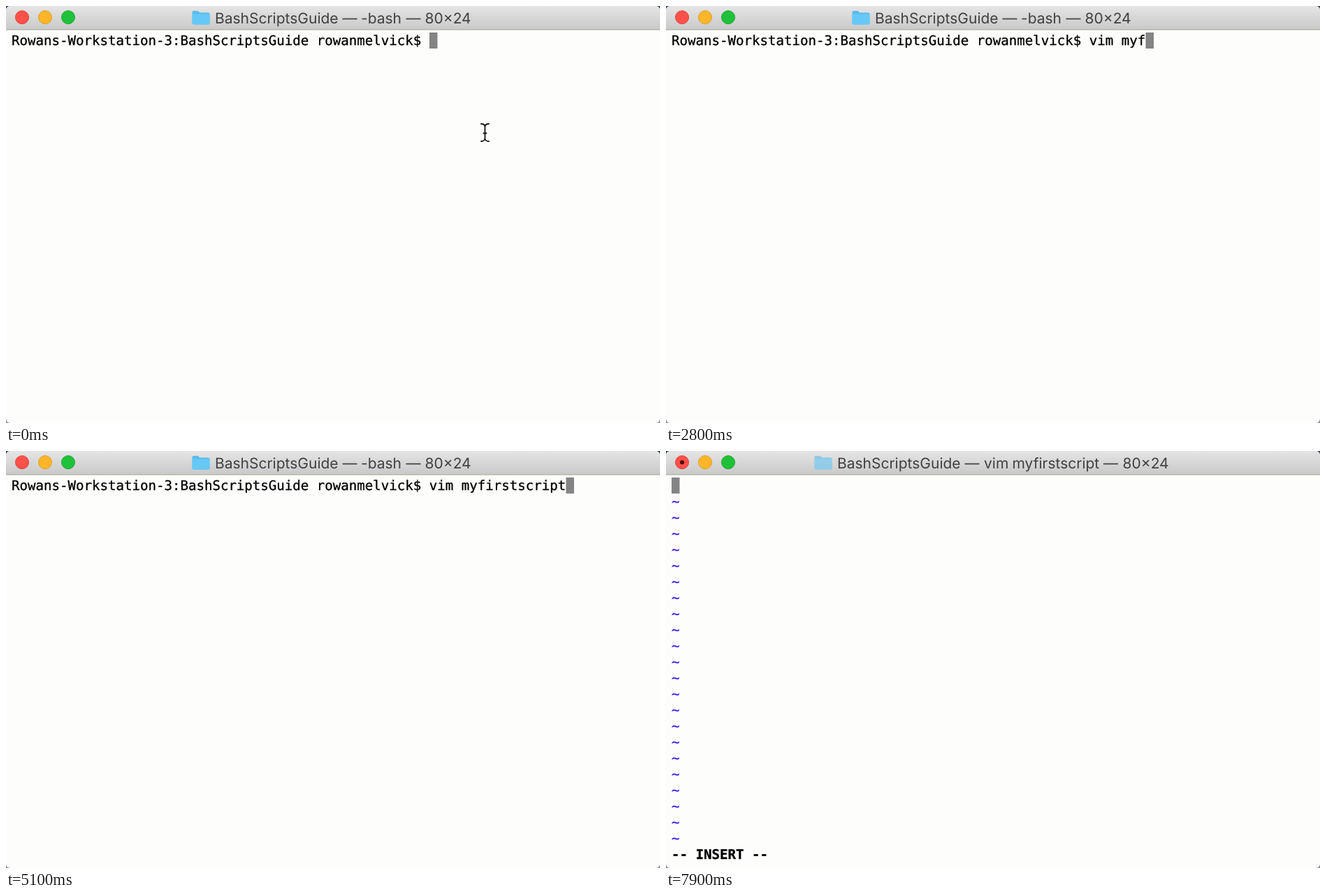
An HTML page for the animation above (8000 ms loop, 936x598 px).

```html
<!DOCTYPE html>
<html lang="en">
<head>
<meta charset="utf-8">
<title>Terminal</title>
<style>
  html, body { margin: 0; width: 100%; height: 100%; overflow: hidden; background: #8b8d90; }
  svg { display: block; width: 936px; height: 598px; }
  text { white-space: pre; text-rendering: geometricPrecision; }
  .mono { font: 19.1px "DejaVu Sans Mono", monospace; stroke-width: 0.3; }
  .bold { font-weight: bold; }
  .title { font: 21px Inter, sans-serif; fill: #404040; }
</style>
</head>
<body>
<svg viewBox="0 0 936 598">
  <defs>
    <linearGradient id="bar" x2="0" y2="1">
      <stop stop-color="#e5e5e5"/>
      <stop offset="1" stop-color="#c9c9c9"/>
    </linearGradient>
    <clipPath id="frame"><rect width="936" height="598" rx="6"/></clipPath>
  </defs>
  <rect width="936" height="20" fill="#34435c"/>
  <g clip-path="url(#frame)">
    <rect width="936" height="598" fill="#fdfdfc"/>
    <rect width="936" height="34" fill="url(#bar)"/>
    <rect y="33.5" width="936" height="1" fill="#a6a694"/>
  </g>
  <g>
    <circle cx="23" cy="16.2" r="9.5" fill="#fe5149" stroke="#e2443d"/>
    <circle cx="56" cy="16.2" r="9.5" fill="#fdb62a" stroke="#dd9f27"/>
    <circle cx="89" cy="16.2" r="9.5" fill="#20c13a" stroke="#1ba830"/>
  </g>
  <circle id="dot" cx="23" cy="16.2" r="3" fill="#4c0605"/>
  <g id="folder">
    <path d="M.5 9q0-2 2-2h6l3 2.500h12q2 0 2 2V24.500q0 2-2 2H2.500q-2 0-2-2z" fill="#58bcec"/>
    <path d="M.5 11.500h25V24.500q0 2-2 2H2.500q-2 0-2-2z" fill="#66c8f6"/>
  </g>
  <g id="title" class="title"></g>
  <rect id="cursor" y="38" width="11.5" height="23" fill="#848484"/>
  <text id="line" class="mono" x="8" y="56" stroke="#000"></text>
  <g id="tildes" class="mono" fill="#3a14f5" stroke="#3a14f5"></g>
  <text id="status" class="mono" x="8" y="585" stroke="#000"></text>
  <g id="pointer" fill="none" stroke-linecap="round">
    <path id="beam" stroke="#fff" stroke-width="4"
      d="M680 169q5 0 5.5 4q.5-4 5.5-4M685.5 173V190M680 194q5 0 5.5-4q.5 4 5.5 4M683.5 182.5h4"/>
  </g>
</svg>
<script>
const $ = id => document.getElementById(id);
const LOOP = 8000, CELL = 11.5, ROW = 23;
const PROMPT = 'Rowans-Workstation-3:BashScriptsGuide rowanmelvick$ ';
const COMMAND = 'vim myfirstscript';
// One keystroke time per character of the command
const KEYS = [1000, 1200, 1400, 1600, 2100, 2400, 2700, 3000, 3200,
              3400, 3600, 3900, 4100, 4300, 4500, 4700, 5000];
const OPEN = 5600, INSERT = 7000;

const SHELL_TITLE = [['BashScriptsGuide', 299], ['—', 481.5], ['-bash', 508],
                     ['—', 572.5], ['80×24', 599.5]];
const VIM_TITLE = [['BashScriptsGuide', 245], ['—', 427.5], ['vim', 455],
                   ['myfirstscript', 495.5], ['—', 626], ['80×24', 653.5]];

const label = (text, x, y) => `<text x="${x}" y="${y}">${text}</text>`;
const show = (id, on) => $(id).style.display = on ? '' : 'none';

$('tildes').innerHTML =
  Array.from({ length: 22 }, (_, i) => label('~', 8, 56 + ROW * (i + 1))).join('');

// Dark beam over its white outline
const front = $('beam').cloneNode();
front.removeAttribute('id');
front.setAttribute('stroke', '#111');
front.setAttribute('stroke-width', 1.8);
$('pointer').append(front);

let titleMode;
function setTitle(vim) {
  if (titleMode === vim) return;
  titleMode = vim;
  const words = vim ? VIM_TITLE : SHELL_TITLE;
  $('title').innerHTML = words.map(([word, x]) => label(word, x, 24.5)).join('');
  $('folder').setAttribute('transform', `translate(${words[0][1] - 33} 0)`);
  $('folder').setAttribute('opacity', vim ? 0.6 : 1);
}

function draw(t) {
  const vim = t >= OPEN, insert = t >= INSERT;
  const typed = KEYS.filter(k => k <= t).length;
  const line = vim ? '' : PROMPT + COMMAND.slice(0, typed);
  setTitle(vim);
  $('line').textContent = line;
  $('cursor').setAttribute('x', 8 + CELL * line.length);
  $('status').textContent = !vim ? '' : insert ? '-- INSERT --' : '"myfirstscript" [New File]';
  $('status').classList.toggle('bold', insert);
  show('dot', vim);
  show('tildes', vim);
  show('pointer', typed === 0);
}

const start = performance.now();
function tick() {
  draw((performance.now() - start) % LOOP);
  requestAnimationFrame(tick);
}
tick();
</script>
</body>
</html>
```
